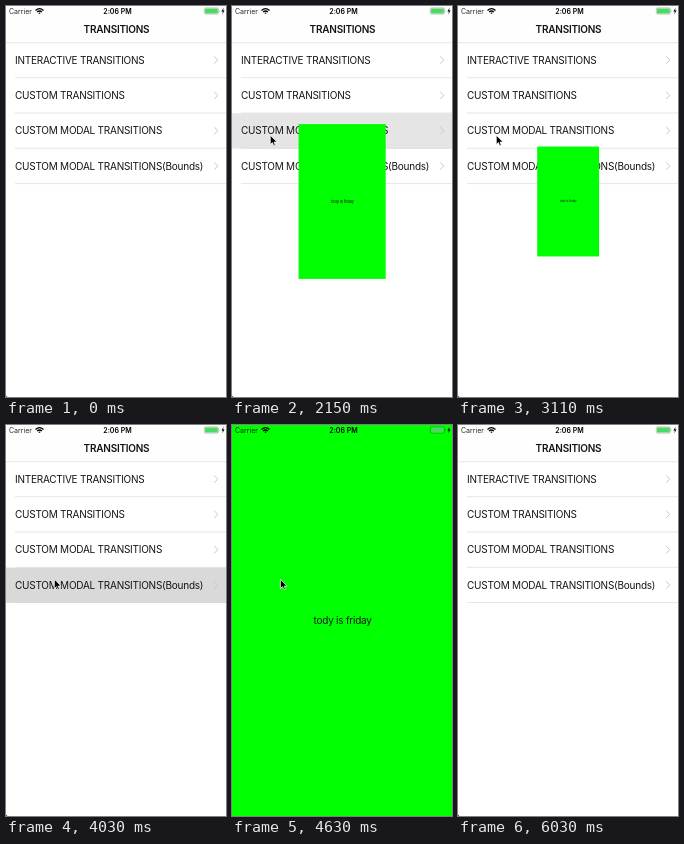
Write an HTML page that moves like this. It is 220 px wide and 391 px high and loops after 6560 ms.

```html
<!DOCTYPE html>
<html lang="en">
<head>
<meta charset="utf-8">
<title>Transitions</title>
<style>
  html, body { margin: 0; width: 100%; height: 100%; overflow: hidden; background: #000; }
  svg { display: block; width: 100%; height: 100%; }
  text { font: 10px Inter, "Liberation Sans", sans-serif; letter-spacing: -.24px; fill: #141414; }
  .title { font-weight: 600; text-anchor: middle; }
  .status text { font-size: 7px; letter-spacing: 0; fill: #000; }
  .line { stroke: #d6d5d9; stroke-width: .6; }
  .chevron { fill: none; stroke: #c7c7cc; stroke-width: 1; }
</style>
</head>
<body>
<svg viewBox="0 0 220 391" preserveAspectRatio="none">
  <rect width="220" height="391"/>
  <g id="screen">
    <rect x="-1.5" y="-2" width="223.2" height="393.2" fill="#fff"/>
    <g id="rows"></g>
    <rect x="-1.5" y="-2" width="223.2" height="38.6" fill="#fefefe"/>
    <path class="line" d="M-1.5 36.7H221.7"/>
    <text class="title" x="110.5" y="26.7">TRANSITIONS</text>
    <path d="M0 389.5L1.5 391H0Z" fill="#555"/>
  </g>
  <g id="modal">
    <rect width="220" height="391" fill="#0f0"/>
    <text x="110.6" y="198.5" text-anchor="middle">tody is friday</text>
  </g>
  <g class="status">
    <text x="3" y="7.5" opacity=".85">Carrier</text>
    <g fill="none" stroke="#000" stroke-width="1.3">
      <path d="M29.5 4.4Q33.5 .9 37.5 4.4M31.1 6.1Q33.5 4 35.9 6.1"/>
      <path d="M32.3 6.9L33.5 8.1 34.7 6.9Q33.5 6 32.3 6.9Z" fill="#000" stroke="none"/>
    </g>
    <text class="title" x="111.5" y="7.5">2:06 PM</text>
    <rect x="198.3" y="1.9" width="14.2" height="6.2" rx="1.5" fill="none" stroke="#000" stroke-opacity=".45" stroke-width=".5"/>
    <rect x="199" y="2.6" width="12.8" height="4.8" rx=".9" fill="#4cd964"/>
    <path d="M213.2 4V6Q214.2 5 213.2 4Z" opacity=".45"/>
    <path d="M217.6 1.8L215.4 5.4H216.9L216.3 8.2 218.6 4.5H217.1Z"/>
  </g>
  <path id="cursor" d="M0 0V9.2L2.1 7.3 3.5 10.4 5 9.8 3.7 6.8H6.7Z" stroke="#fff" stroke-width=".7"/>
</svg>
<script>
const LOOP = 6560, ROW_HEIGHT = 35.3;
const labels = [
  'INTERACTIVE TRANSITIONS',
  'CUSTOM TRANSITIONS',
  'CUSTOM MODAL TRANSITIONS',
  'CUSTOM MODAL TRANSITIONS(Bounds)'
];
const byId = id => document.getElementById(id);
const rows = byId('rows'), screenView = byId('screen'), modal = byId('modal'), cursor = byId('cursor');

rows.innerHTML = labels.map((label, i) => `
  <g transform="translate(0 ${36.7 + i * ROW_HEIGHT})">
    <rect class="highlight" x="-1.5" width="223.2" height="${ROW_HEIGHT}" fill="#d9d9d9" opacity="0"/>
    <text x="9" y="21">${label}</text>
    <path class="chevron" d="M208.2 13.8L211.8 17.4 208.2 21"/>
    <path class="line" d="M9 ${ROW_HEIGHT - .3}H221.7"/>
  </g>`).join('');
const highlights = rows.querySelectorAll('.highlight');

const ease = p => p * p * (3 - 2 * p);
const mix = (a, b, p) => a + (b - a) * p;
const place = (node, x, y, scale = 1) =>
  node.setAttribute('transform', `translate(${x} ${y}) scale(${scale})`);
const placeCentered = (node, scale) =>
  place(node, 110.2 * (1 - scale), 195.5 * (1 - scale), scale);

// Progress 0..1, advancing only every `step` ms, first visible change at `first`.
function phase(t, first, last, step, begin = first) {
  if (t < first) return 0;
  if (t >= last) return 1;
  const held = first + Math.floor((t - first) / step) * step;
  return (held - begin) / (last - begin);
}

// Each move: first change, last change, step, begin, target x, target y
const moves = [
  [540, 1140, 75, 465, 38.3, 140.3],
  [1240, 1520, 70, 1170, 38.3, 129.3],
  [3630, 3850, 73, 3557, 48.4, 154.3],
  [5910, 6030, 60, 5850, 279, 500]
];

function cursorAt(t) {
  let x = -8, y = 157;
  for (const [first, last, step, begin, toX, toY] of moves) {
    const p = phase(t, first, last, step, begin);
    x = mix(x, toX, p);
    y = mix(y, toY, p);
  }
  return [x, y];
}

function draw(t) {
  const shrink = ease(phase(t, 4030, 4370, 85));
  const restore = ease(phase(t, 5360, 5620, 87, 5320));
  placeCentered(screenView, 1 - .1 * (shrink - restore));
  place(rows, 0, t < 5190 ? 0 : -11.7 * (1 - restore));

  highlights[2].setAttribute('opacity', t < 1870 || t >= 2400 ? 0 : 1 - phase(t, 1870, 2570, 76));
  highlights[3].setAttribute('opacity', t < 4030 || t >= 5190 ? 0 : 1 - phase(t, 4030, 4730, 85));

  if (t < 4000) {
    const open = ease(phase(t, 1870, 2400, 76));
    const close = ease(phase(t, 2820, 3290, 58, 2775));
    placeCentered(modal, open - close);
  } else {
    const slide = t < 5190 ? ease(phase(t, 4370, 4630, 90, 4339)) : 0;
    place(modal, 220 * (1 - slide), 0);
  }
  place(cursor, ...cursorAt(t));
}

function tick() {
  draw(performance.now() % LOOP);
  requestAnimationFrame(tick);
}
tick();
</script>
</body>
</html>
```
